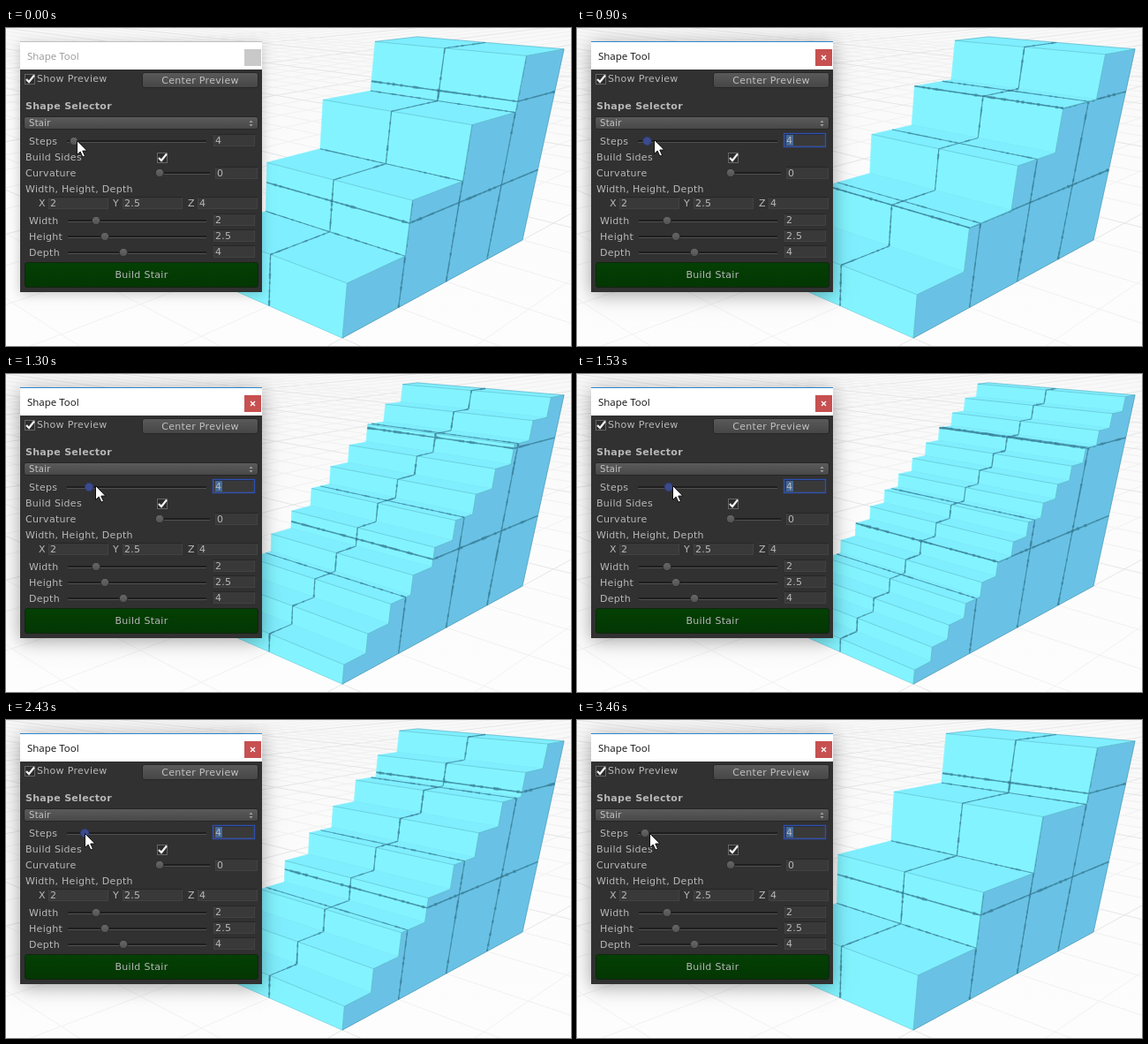
These frames come from a looping animation (640x360 px, 3.53 s). An HTML page with a canvas:

```html
<!DOCTYPE html>
<html lang="en">
<head>
<meta charset="utf-8">
<title>Stair tool</title>
<style>
  html, body { margin: 0; width: 100%; height: 100%; overflow: hidden; background: #fbfbfb; }
  canvas { display: block; }
</style>
</head>
<body>
<canvas id="stage" width="640" height="360"></canvas>
<script>
const ctx = document.getElementById('stage').getContext('2d');
const LOOP = 3530;
const WIDTH = 2, HEIGHT = 2.5, DEPTH = 4;
const UI_FONT = '"DejaVu Sans", sans-serif';
const TITLE_FONT = '"Open Sans", sans-serif';
const EDGE = 'rgba(40,112,138,.4)';

// [time, step count]
const STEPS = [[0, 4], [760, 5], [960, 6], [1050, 7], [1130, 8], [1190, 9], [1230, 10],
  [1280, 11], [1350, 12], [1410, 13], [1460, 14], [1520, 15], [1930, 14], [2040, 13],
  [2150, 12], [2230, 11], [2310, 10], [2400, 9], [2530, 8], [2660, 7], [2790, 6],
  [2900, 5], [3020, 4]];
// [time, x, y] of the pointer tip
const POINTER = [[0, 79.5, 127], [30, 79.5, 127], [100, 78, 126], [700, 78, 126], [900, 87, 126],
  [1300, 101, 126], [1530, 108, 126], [1830, 108, 126], [2100, 98, 127], [2330, 91, 128],
  [2430, 89.5, 128], [2830, 82, 127], [2900, 80, 127], [3130, 73, 126], [3360, 73, 126],
  [3460, 82, 128], [3530, 82, 128]];

function stepsAt(t) {
  let n = STEPS[0][1];
  for (const [time, count] of STEPS) if (t >= time) n = count;
  return n;
}

function pointerAt(t) {
  const i = Math.max(1, POINTER.findIndex(k => k[0] > t));
  const [t0, x0, y0] = POINTER[i - 1], [t1, x1, y1] = POINTER[i];
  const f = (t - t0) / (t1 - t0);
  return [Math.round(x0 + (x1 - x0) * f), Math.round(y0 + (y1 - y0) * f)];
}

// Perspective camera; x runs left, y up and z back from the near bottom corner.
const depthOf = (x, y, z) => 1 + 0.0925 * x - 0.069 * y + 0.09 * z;
function project([x, y, z]) {
  const w = depthOf(x, y, z);
  return [(381 - 55.4 * x - 18 * y + 103.65 * z) / w,
          (351 - 7.4 * x - 119.2 * y - 6.15 * z) / w];
}

function tracePath(points) {
  ctx.beginPath();
  points.forEach(p => ctx.lineTo(...project(p)));
}

function face(points, color) {
  tracePath(points);
  ctx.closePath();
  ctx.fillStyle = ctx.strokeStyle = color;
  ctx.lineWidth = 0.6;
  ctx.fill();
  ctx.stroke();
}

function line(a, b, color, width) {
  tracePath([a, b]);
  ctx.strokeStyle = color;
  ctx.lineWidth = width;
  ctx.stroke();
}

function random(seed) {
  const s = Math.sin(seed * 127.1 + 11.7) * 43758.5453;
  return s - Math.floor(s);
}

// Scratched seam: a soft line with an uneven darker core.
function seam(a, b, weight = 1) {
  const [p, q] = [project(a), project(b)];
  const length = Math.hypot(q[0] - p[0], q[1] - p[1]);
  const count = Math.max(1, Math.round(length / 3));
  const seed = a[0] * 3 + a[1] * 7 + a[2] * 13 + b[0] + b[1] * 5;
  const at = f => [p[0] + (q[0] - p[0]) * f, p[1] + (q[1] - p[1]) * f];
  line(a, b, 'rgba(58,130,155,.6)', 1.6 * weight);
  for (let i = 0; i < count; i++) {
    const r = random(seed + i);
    ctx.beginPath();
    ctx.moveTo(...at(i / count));
    ctx.lineTo(...at((i + 1) / count));
    ctx.strokeStyle = `rgba(48,112,136,${0.25 + r * 0.35})`;
    ctx.lineWidth = weight * (1 + r * r * 2.4);
    ctx.stroke();
  }
}

function drawGround() {
  const sky = ctx.createLinearGradient(0, 0, 0, 360);
  sky.addColorStop(0, '#f8f8f8');
  sky.addColorStop(0.5, '#fcfcfc');
  sky.addColorStop(1, '#fdfdfd');
  ctx.fillStyle = sky;
  ctx.fillRect(0, 0, 640, 360);
  for (let k = -14; k <= 24; k++) {
    const color = k % 5 ? '#f1f1f1' : '#e6e6e6';
    const nearZ = (0.3 - 1 - 0.0925 * k) / 0.09;
    const nearX = (0.3 - 1 - 0.09 * k) / 0.0925;
    line([k, 0, nearZ], [k, 0, 40], color, 1);
    line([nearX, 0, k], [40, 0, k], color, 1);
  }
}

function drawStair(n) {
  const rise = HEIGHT / n, run = DEPTH / n, tiny = 1e-6;
  const profile = [[0, 0, 0]];
  for (let i = 0; i < n; i++) {
    profile.push([0, (i + 1) * rise, i * run], [0, (i + 1) * rise, (i + 1) * run]);
  }
  profile.push([0, 0, DEPTH]);
  face(profile, '#69c2e5');

  for (let k = 1; k < DEPTH; k++) {
    const i = Math.floor(k / run + tiny);
    seam([0, 0, k], [0, (i + 1) * rise, k], 0.75);
  }
  for (let k = 1; k < HEIGHT; k++) {
    const i = Math.ceil(k / rise - tiny) - 1;
    seam([0, k, i * run], [0, k, DEPTH]);
  }

  for (let i = n - 1; i >= 0; i--) {
    const low = i * rise, high = low + rise, z0 = i * run, z1 = z0 + run;
    face([[0, high, z0], [WIDTH, high, z0], [WIDTH, high, z1], [0, high, z1]], '#7feefe');
    face([[0, low, z0], [WIDTH, low, z0], [WIDTH, high, z0], [0, high, z0]], '#83f4ff');
    line([0, high, z0], [WIDTH, high, z0], 'rgba(48,130,155,.4)', 0.8);
    line([0, low, z0], [WIDTH, low, z0], 'rgba(48,130,155,.25)', 0.7);
    seam([1, low, z0], [1, high, z0], 0.75);
    seam([1, high, z0], [1, high, z1], 0.65);
    for (let k = 1; k < HEIGHT; k++) {
      if (k > low + tiny && k <= high + tiny) seam([0, k, z0], [WIDTH, k, z0]);
    }
    for (let k = 1; k < DEPTH; k++) {
      if (k > z0 + tiny && k <= z1 + tiny) seam([0, high, k], [WIDTH, high, k], 0.6);
    }
  }

  tracePath(profile);
  ctx.closePath();
  ctx.strokeStyle = EDGE;
  ctx.lineWidth = 0.9;
  ctx.stroke();
  line([0, HEIGHT, DEPTH], [WIDTH, HEIGHT, DEPTH], EDGE, 0.8);
  line([WIDTH, HEIGHT, DEPTH - run], [WIDTH, HEIGHT, DEPTH], EDGE, 0.8);
}

function box(x, y, w, h, fill, border) {
  ctx.fillStyle = border;
  ctx.fillRect(x, y, w, h);
  ctx.fillStyle = fill;
  ctx.fillRect(x + 1, y + 1, w - 2, h - 2);
}

function text(str, x, y, { size = 11, color = '#b8b8b8', weight = '', family = UI_FONT,
                          spacing = 0.3, align = 'left' } = {}) {
  ctx.font = `${weight} ${size}px ${family}`;
  ctx.letterSpacing = spacing + 'px';
  ctx.textAlign = align;
  ctx.fillStyle = color;
  ctx.fillText(str, x, y);
}

function shade(y, h, top, bottom) {
  const g = ctx.createLinearGradient(0, y, 0, y + h);
  g.addColorStop(0, top);
  g.addColorStop(1, bottom);
  return g;
}

function button(x, y, w, h, top, bottom, border = '#262626') {
  ctx.beginPath();
  ctx.roundRect(x + 0.5, y + 0.5, w - 1, h - 1, 2.5);
  ctx.fillStyle = shade(y, h, top, bottom);
  ctx.strokeStyle = border;
  ctx.lineWidth = 1;
  ctx.fill();
  ctx.stroke();
}

function field(value, x, y, w) {
  box(x, y, w, 14, '#393939', '#424242');
  ctx.fillStyle = '#262626';
  ctx.fillRect(x, y, w, 1);
  text(value, x + 2, y + 11);
}

function slider(x0, x1, y, knob, active) {
  ctx.fillStyle = '#1e1e1e';
  ctx.fillRect(x0, y - 1, x1 - x0, 2);
  ctx.fillStyle = '#505050';
  ctx.fillRect(x0, y + 1, x1 - x0, 1);
  ctx.beginPath();
  ctx.arc(knob, y, 4.7, 0, 7);
  ctx.fillStyle = active ? '#3c4a8e' : shade(y - 5, 10, '#696969', '#505050');
  ctx.strokeStyle = active ? '#2e3a74' : '#2c2c2c';
  ctx.lineWidth = 1;
  ctx.fill();
  ctx.stroke();
}

function checkbox(x, y) {
  box(x, y, 12, 12, '#2c2c2c', '#666666');
  ctx.beginPath();
  ctx.moveTo(x + 2, y + 6);
  ctx.lineTo(x + 5, y + 9);
  ctx.lineTo(x + 11, y + 1.5);
  ctx.strokeStyle = '#f2f2f2';
  ctx.lineWidth = 2.2;
  ctx.stroke();
}

function drawFrame(active) {
  ctx.save();
  ctx.shadowColor = active ? 'rgba(0,0,0,.36)' : 'rgba(0,0,0,.22)';
  ctx.shadowBlur = active ? 20 : 12;
  ctx.shadowOffsetY = active ? 3 : 2;
  ctx.fillStyle = '#313131';
  ctx.fillRect(16, 16, 274, 283);
  ctx.restore();

  ctx.fillStyle = '#ffffff';
  ctx.fillRect(16, 16, 274, 31);
  ctx.fillStyle = active ? '#2f86cb' : '#c0c0c0';
  ctx.fillRect(16, 15, 274, 1);
  text('Shape Tool', 24, 36, { size: 11.5, color: active ? '#111' : '#999', family: TITLE_FONT, spacing: 0 });
  ctx.fillStyle = active ? '#c75050' : '#c9c9c9';
  ctx.fillRect(270, 24, 19, 19);
  if (active) {
    ctx.beginPath();
    ctx.moveTo(277, 31); ctx.lineTo(282, 36);
    ctx.moveTo(282, 31); ctx.lineTo(277, 36);
    ctx.strokeStyle = '#fff';
    ctx.lineWidth = 1.4;
    ctx.stroke();
  }
}

function drawPanel(t, n) {
  const focused = t >= 460;
  drawFrame(t >= 430);

  checkbox(21, 52);
  text('Show Preview', 35, 61);
  button(154, 50, 132, 18, '#5b5b5b', '#454545');
  text('Center Preview', 220, 63, { align: 'center', color: '#c0c0c0' });
  text('Shape Selector', 22, 92, { weight: 'bold' });
  button(20, 100, 266, 15, '#5c5c5c', '#474747');
  text('Stair', 26, 111, { size: 10, color: '#c4c4c4' });
  ctx.fillStyle = '#a0a0a0';
  ctx.beginPath();
  ctx.moveTo(275.5, 107); ctx.lineTo(277.5, 104.5); ctx.lineTo(279.5, 107);
  ctx.moveTo(275.5, 109); ctx.lineTo(277.5, 111.5); ctx.lineTo(279.5, 109);
  ctx.fill();

  text('Steps', 26, 132);
  slider(69, 227, 128, 77 + (n - 4) * 2.44, focused && t < 3130);
  field('4', 235, 120, 47);
  if (focused) {
    ctx.strokeStyle = '#2f4fae';
    ctx.lineWidth = 1.4;
    ctx.strokeRect(234.5, 119.5, 47, 15);
    ctx.fillStyle = '#43689a';
    ctx.fillRect(237, 121, 8, 12);
    text('4', 237, 131);
  }

  text('Build Sides', 22, 150);
  checkbox(171, 141);
  text('Curvature', 22, 168);
  slider(170, 231, 164, 174, false);
  field('0', 237, 157, 48);
  text('Width, Height, Depth', 22, 186);
  [['X', '2', 37, 48], ['Y', '2.5', 121, 132], ['Z', '4', 206, 217]].forEach(([name, value, x, fx]) => {
    text(name, x, 202);
    field(value, fx, 191, 68);
  });
  [['Width', '2', 218, 102], ['Height', '2.5', 236, 112], ['Depth', '4', 254, 133]].forEach(([name, value, y, knob]) => {
    text(name, 26, y + 4);
    slider(70, 227, y, knob, false);
    field(value, 235, y - 8, 47);
  });

  button(21, 265, 265, 29, '#044004', '#033603', '#122412');
  text('Build Stair', 153.5, 283, { align: 'center' });
}

function drawPointer([x, y]) {
  const outline = [[0, 0], [0, 16], [3.7, 12.6], [6.4, 18.6], [9, 17.5], [6.3, 11.6], [11.3, 11.5]];
  ctx.beginPath();
  outline.forEach(([dx, dy]) => ctx.lineTo(x + dx + 0.5, y + dy + 0.5));
  ctx.closePath();
  ctx.fillStyle = '#fff';
  ctx.strokeStyle = '#111';
  ctx.lineWidth = 1;
  ctx.fill();
  ctx.stroke();
}

function render(t) {
  const n = stepsAt(t);
  drawGround();
  drawStair(n);
  drawPanel(t, n);
  drawPointer(pointerAt(t));
}

const start = performance.now();
function tick() {
  render((performance.now() - start) % LOOP);
  requestAnimationFrame(tick);
}
tick();
</script>
</body>
</html>
```
